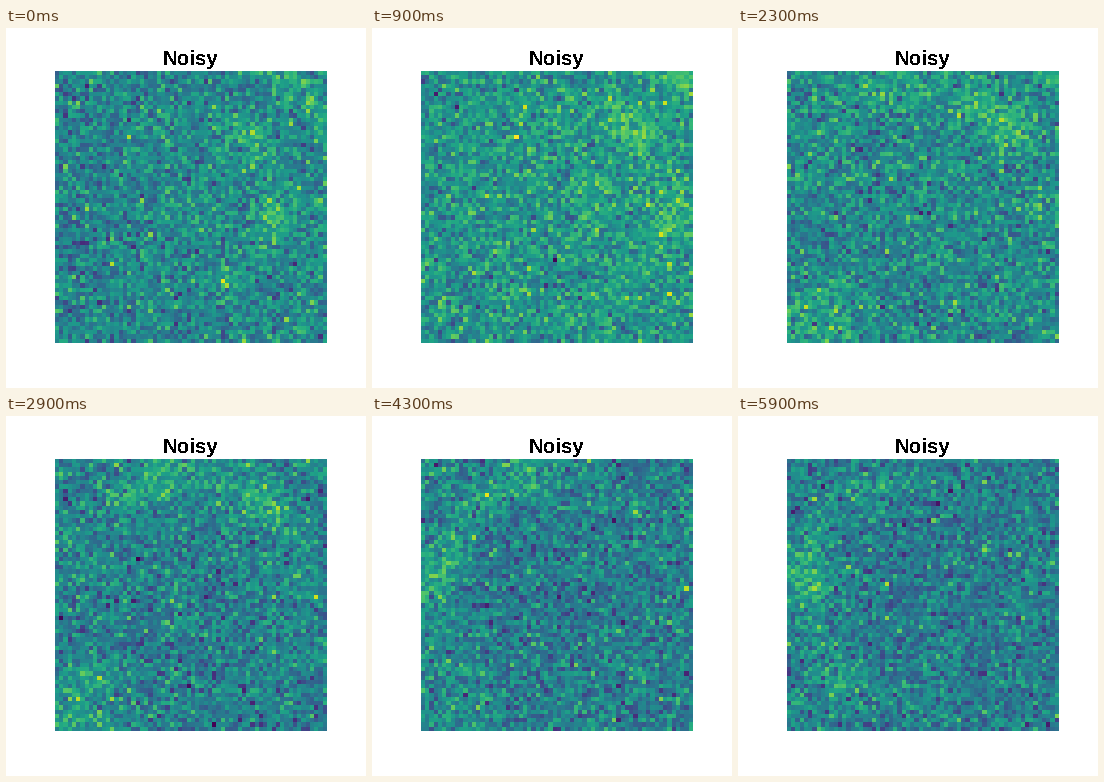
A matplotlib script that plays this animation: 360 by 360 pixels, repeating every 6 s.

```python
import matplotlib.pyplot as plt
import numpy as np
from matplotlib.animation import FuncAnimation

STAGE = 360
FRAMES = 60
CELLS = 64
LEFT, TOP, SIDE = 49, 43, 272
NOISE = 0.122
RING_GAP = 73    # pixels between neighbouring rings
RING_WIDTH = 21

steps = (np.arange(CELLS) + 0.5 - CELLS / 2) * SIDE / CELLS
dx, dy = np.meshgrid(steps, -steps)
radius = np.hypot(dx, dy)
angle = np.arctan2(dy, dx)
lobes = 0.7 + 0.3 * np.cos(6 * (angle - np.radians(50)))


def bell(value, width):
    return np.exp(-(value / width) ** 2)


def smoothstep(x):
    return x * x * (3 - 2 * x)


def signal(t):
    """Lobed rings that swell outward while their bright side turns."""
    turn = np.radians(10 + 165 * smoothstep(t / (FRAMES - 1)))
    focus = radius / 73
    bright_side = np.exp(focus * (np.cos(angle - turn) - 1))
    middle = 85 + 35 * (1 - np.exp(-t / 8))
    inner_fade = max(0, 1 - t / 32)

    rings = sum(power * bell(radius - middle - n * RING_GAP, RING_WIDTH)
                for n, power in ((-1, 0.15 * inner_fade), (0, 0.21), (1, 0.21)))
    corner = 0.16 * bell(t - 29, 14) * bell(np.hypot(dx + 105, dy + 110), 36)
    level = 0.42 + 0.1 * bell(t - 13, 11)
    return level + rings * lobes * bright_side + corner


def noisy(t):
    rng = np.random.default_rng(100 + t)
    return np.clip(signal(t) + rng.normal(0, NOISE, (CELLS, CELLS)), 0, 1)


fig = plt.figure(figsize=(STAGE / 72, STAGE / 72), dpi=72, facecolor="white")
ax = fig.add_axes([LEFT / STAGE, 1 - (TOP + SIDE) / STAGE,
                   SIDE / STAGE, SIDE / STAGE])
ax.axis("off")
image = ax.imshow(noisy(0), cmap="viridis", vmin=0, vmax=1,
                  interpolation="nearest", aspect="auto")
fig.text((LEFT + SIDE / 2) / STAGE, 1 - 37 / STAGE, "Noisy", ha="center",
         va="baseline", fontsize=20.5, fontweight="bold",
         family="Liberation Sans", color="black", antialiased=False)


def update(t):
    image.set_data(noisy(t))
    return [image]


anim = FuncAnimation(fig, update, frames=FRAMES, interval=100,
                     repeat=True, repeat_delay=0, blit=False)
plt.show()
```
